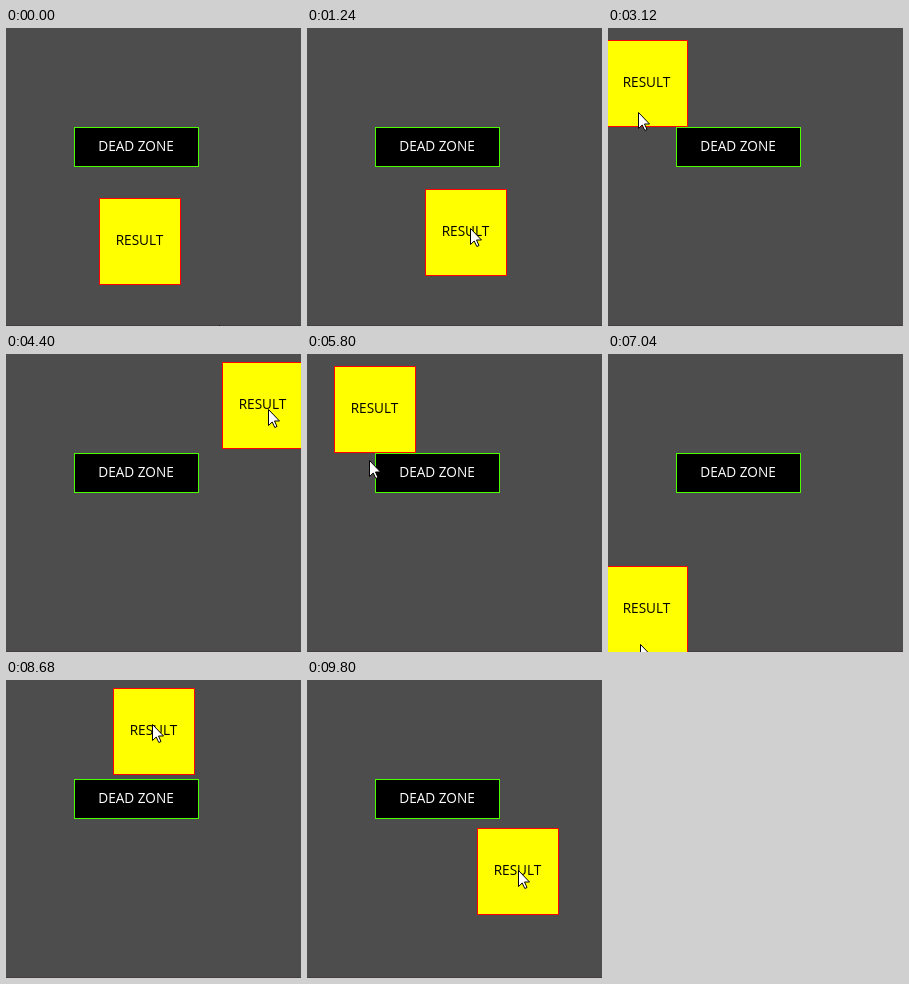
Write an HTML page that moves like this. It is 295x298 px and loops after 9960 ms.

```html
<!DOCTYPE html>
<html lang="en">
<head>
<meta charset="utf-8">
<title>Dead zone drag</title>
<style>
  html, body { margin: 0; width: 100%; height: 100%; overflow: hidden; background: #4d4d4d; }
  svg { display: block; }
  text { font: 13.6px "Open Sans", "Noto Sans", sans-serif; text-anchor: middle; }
</style>
</head>
<body>
<svg width="295" height="298" viewBox="0 0 295 298">
  <rect width="295" height="298" fill="#4d4d4d"/>
  <rect y="297" width="295" height="1" fill="#443e43"/>
  <rect x="68.5" y="99.5" width="124" height="39" fill="#000" stroke="#4cff00"/>
  <text x="130" y="123" fill="#fff">DEAD ZONE</text>
  <g id="box">
    <rect x=".5" y=".5" width="81" height="86" fill="#ff0" stroke="#f00"/>
    <text x="40.5" y="47">RESULT</text>
  </g>
  <path id="cursor" d="M.5 .5V16.5L4.2 13L6.8 18.5L9 17.5L6.5 12H11.5Z" fill="#fff" stroke="#000"/>
</svg>
<script>
const LOOP = 9960, STEP = 40, GRAB = 600;
const W = 82, H = 87;
const zone = { l: 68, t: 99, r: 193, b: 139 };
const area = { l: -2, t: -1, r: 216, b: 212 };

// Each stroke: when the pointer sets off, then the points it passes (time, x, y)
const start = [213, 297];
const strokes = [
  [40, [640, 142, 218]],
  [900, [1880, 205, 126], [2060, 198, 80], [2340, 160, 40], [2880, 57, 102], [3130, 30, 84]],
  [3320, [3460, 30, 10]],
  [3760, [4400, 262, 50], [4680, 260, 94], [5200, 185, 124], [5720, 86, 121],
    [5840, 62, 106], [6720, 28, 223], [7040, 32, 290]],
  [7180, [7480, 262, 290]],
  [7740, [8040, 238, 150], [8260, 178, 120], [8400, 193, 135]],
  [8520, [8700, 146, 46], [8900, 150, 36], [9520, 215, 135], [9800, 211, 190]]
];

const keys = [];
for (const [begin, ...points] of strokes) {
  const rest = keys.length ? keys[keys.length - 1].slice(1) : start;
  keys.push([begin, ...rest], ...points);
}

const clamp = (v, lo, hi) => Math.min(hi, Math.max(lo, v));

const slope = (i, axis) =>
  (keys[i + 1][axis] - keys[i][axis]) / (keys[i + 1][0] - keys[i][0]);

function tangent(i, axis) {
  if (i === 0 || i === keys.length - 1) return 0;
  const a = slope(i - 1, axis), b = slope(i, axis);
  return a * b <= 0 ? 0 : 2 * a * b / (a + b);
}

// Smooth curve through the keys that never overshoots them
function pointer(t) {
  t = clamp(t, keys[0][0], keys[keys.length - 1][0]);
  let i = 0;
  while (i < keys.length - 2 && t > keys[i + 1][0]) i++;
  const d = keys[i + 1][0] - keys[i][0], u = (t - keys[i][0]) / d;
  return [1, 2].map(axis => {
    const p = keys[i][axis], q = keys[i + 1][axis];
    return p + (q - p) * u * u * (3 - 2 * u)
      + d * u * (1 - u) * ((1 - u) * tangent(i, axis) - u * tangent(i + 1, axis));
  });
}

// Keep the box inside the area and push it out of the zone the shortest way
function place(px, py) {
  const x = clamp(px - 41, area.l, area.r), y = clamp(py - 42, area.t, area.b);
  if (x >= zone.r || x + W <= zone.l || y >= zone.b || y + H <= zone.t) return [x, y];
  const exits = [[zone.l - W, y], [zone.r, y], [x, zone.t - H], [x, zone.b]];
  const cost = ([ex, ey]) => Math.abs(ex - x) + Math.abs(ey - y);
  return exits.filter(([ex]) => ex >= area.l && ex <= area.r)
    .sort((a, b) => cost(a) - cost(b))[0];
}

const box = document.getElementById("box");
const cursor = document.getElementById("cursor");
const move = (el, pos) =>
  el.setAttribute("transform", `translate(${pos.map(Math.round).join(" ")})`);

function draw() {
  const t = Math.floor(performance.now() % LOOP / STEP) * STEP;
  move(box, t < GRAB ? [93, 170] : place(...pointer(t)));
  move(cursor, pointer(t + STEP)); // the box trails the pointer by one step
  requestAnimationFrame(draw);
}
draw();
</script>
</body>
</html>
```
